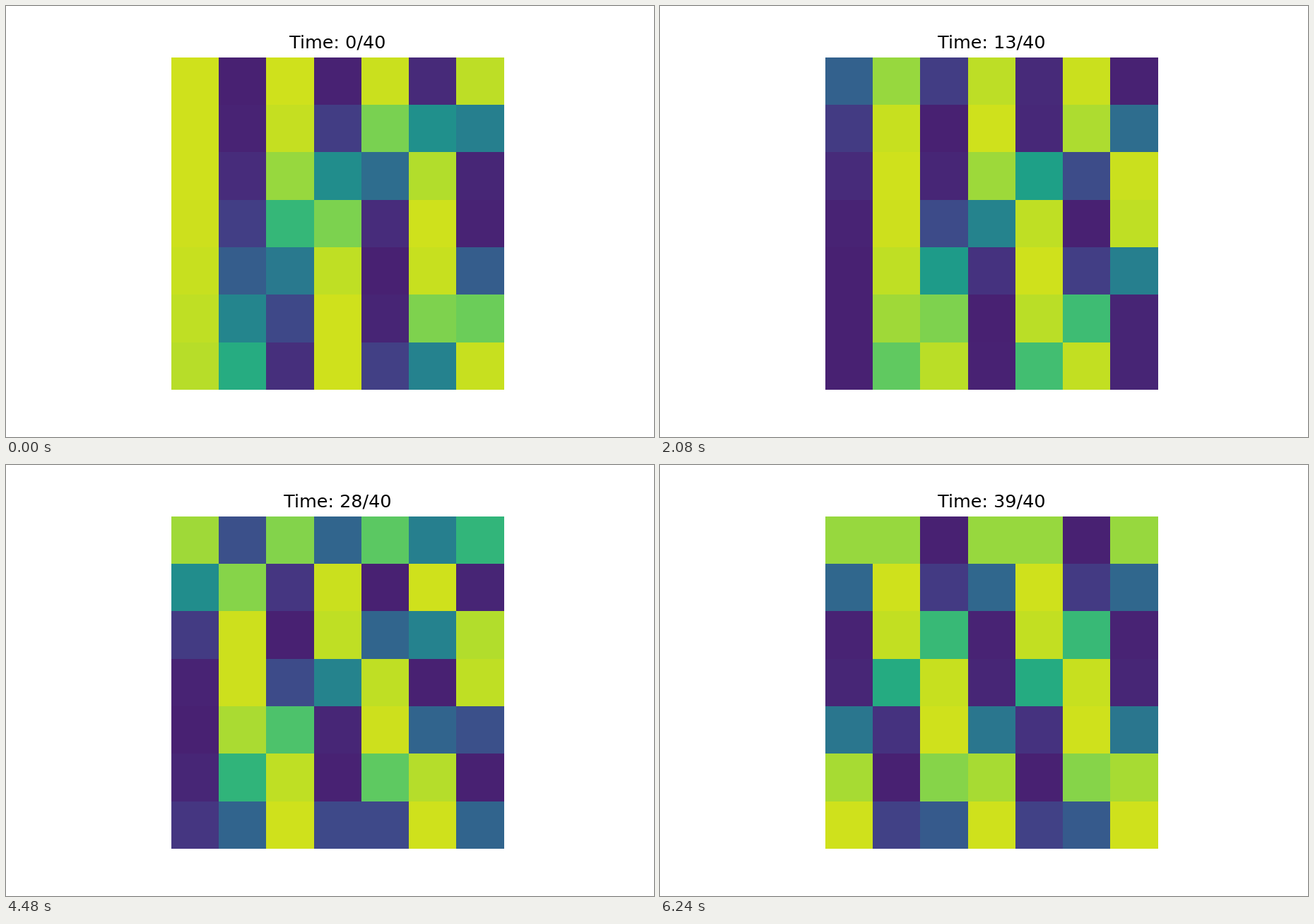
A matplotlib script for the animation above (6400 ms loop, 917x611 px).

```python
import numpy as np
import matplotlib.pyplot as plt
from matplotlib.animation import FuncAnimation

WIDTH, HEIGHT, DPI = 917, 611, 152.83
LEFT, TOP, SIDE = 234.4, 73.3, 470.4
SIZE = 7
STEPS = 40
INTERVAL = 160

# Dark stripes cross the grid. Each key point gives the place of the first
# stripe in the top and bottom row, then the stripe spacing in those rows.
KEYS = {
    0: (-1.1, -1.0, 2.1, 2.7),
    6: (-1.1, -0.7, 2.1, 2.9),
    13: (-0.4, 0.1, 2.1, 3.05),
    21: (-0.5, 0.4, 2.2, 3.0),
    28: (-0.7, 0.4, 2.05, 3.1),
    32: (-0.8, 0.6, 2.2, 3.1),
    39: (-1.0, 1.45, 3.0, 3.0),
}

cols = np.arange(SIZE)
depth = np.linspace(0, 1, SIZE)[:, None]


def mix(a, b, u):
    return a + (b - a) * u


def levels(step):
    """Cell levels as a striped wave, flattened towards dark and light."""
    top, bottom, gap_top, gap_bottom = (
        np.interp(step, list(KEYS), track) for track in zip(*KEYS.values()))
    start = mix(top, bottom, depth)
    gap = mix(gap_top, gap_bottom, depth)
    wave = np.cos(2 * np.pi * (cols - start) / gap)
    return 0.5 - 0.45 * np.tanh(1.7 * (wave - 0.1))


# The tiny margin keeps the pixel size from rounding down.
fig = plt.figure(figsize=((WIDTH + 0.001) / DPI, (HEIGHT + 0.001) / DPI),
                 dpi=DPI, facecolor="white")
ax = fig.add_axes([LEFT / WIDTH, 1 - (TOP + SIDE) / HEIGHT,
                   SIDE / WIDTH, SIDE / HEIGHT])
ax.axis("off")
grid = ax.imshow(np.zeros((SIZE, SIZE)), cmap="viridis", vmin=0, vmax=1,
                 interpolation="nearest", aspect="auto")
title = ax.set_title("", fontfamily="DejaVu Sans", fontsize=12, pad=6.3)


def draw(step):
    grid.set_data(levels(step))
    title.set_text(f"Time: {step}/{STEPS}")
    return grid, title


anim = FuncAnimation(fig, draw, frames=STEPS, interval=INTERVAL,
                     init_func=lambda: draw(0), repeat=True, repeat_delay=0,
                     blit=False)
plt.show()
```
